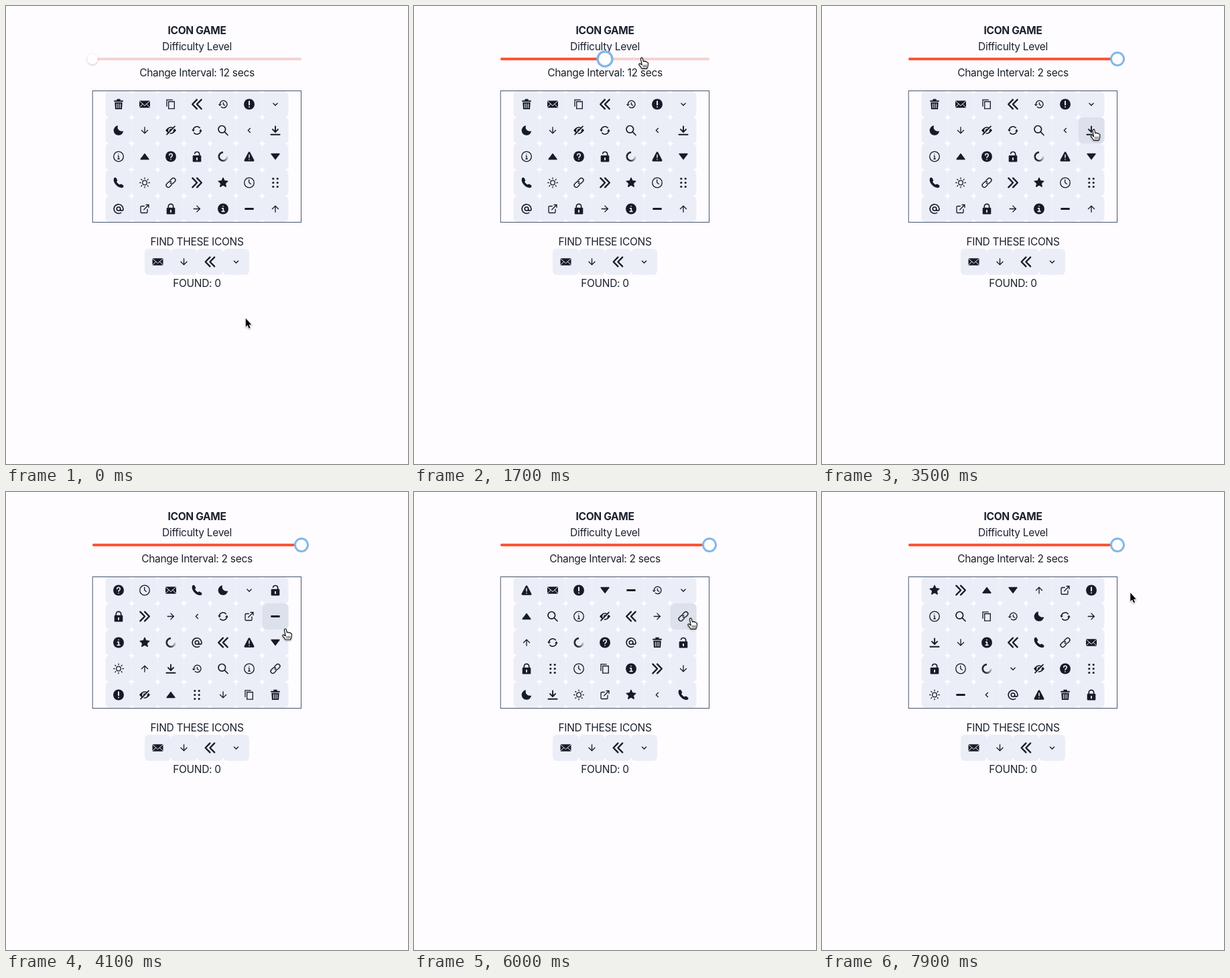
An HTML page with a canvas for the animation above (8000 ms loop, 600 by 683 pixels).

```html
<!DOCTYPE html>
<html lang="en">
<head>
<meta charset="utf-8">
<title>Icon game</title>
<style>
html, body { margin: 0; width: 100%; height: 100%; overflow: hidden; background: #fefcff; }
canvas { display: block; }
</style>
</head>
<body>
<canvas id="stage" width="600" height="683"></canvas>
<script>
const ctx = document.getElementById('stage').getContext('2d');
const LOOP = 8000, STEP = 100, CELL = 39;
const INK = '#171b27', CELL_COLOR = '#ebeef6', HOVER_COLOR = '#dde1eb';
const GRID = { x: 148.5, y: 127, cols: 7, rows: 5 };
const TRACK = { x: 129, y: 79, w: 312 };

const circle = (x, y, r) => `M${x - r} ${y}a${r} ${r} 0 1 0 ${2 * r} 0a${r} ${r} 0 1 0 ${-2 * r} 0z`;
const polar = (r, a) => `${r * Math.cos(a)} ${r * Math.sin(a)}`;
const ring = (n, fn) => Array.from({ length: n }, (_, i) => fn(i, i / n * 2 * Math.PI - Math.PI / 2)).join('');

const sunRays = ring(8, (i, a) => `M${polar(6, a)}L${polar(7.3, a)}`);
const starShape = ring(10, (i, a) => `${i ? 'L' : 'M'}${polar(i % 2 ? 3.5 : 7.3, a)}`) + 'z';
const gripDots = [-6, 0, 6].map(y => circle(-3.2, y, 1.6) + circle(3.2, y, 1.6)).join('');
const lockBody = 'M-5-1.7H5Q6.3-1.7 6.3-.4V6.7Q6.3 8 5 8H-5Q-6.3 8-6.3 6.7V-.4Q-6.3-1.7-5-1.7z';
const keyhole = 'M0 2.2V2.4M0 2.3V4.8';

// fill: solid part, cut: strokes in the cell colour, line: strokes on top
const ICONS = {
  T: { fill: 'M-6.7-5.7h13.4v2h-13.4zM-2.6-5.7v-2h5.2v2zM-5.7-2.8H5.7L5 7.6H-5z', cut: 'M-2.6-.6v6M0-.6v6M2.6-.6v6', cutW: 1.1 },
  M: { fill: 'M-7.3-5.3H7.3Q8-5.3 8-4.6V4.6Q8 5.3 7.3 5.3H-7.3Q-8 5.3-8 4.6V-4.6Q-8-5.3-7.3-5.3z', cut: 'M-8-5L0 2.2L8-5M-8 4.8L-2.8-.2M8 4.8L2.8-.2', cutW: 1 },
  C: { line: 'M-6 3.4V-6.7H2.7M-3.3-4H5.3V6.7H-3.3z', w: 1.33, sharp: true },
  L: { line: 'M6.65-6.8L-.1 0L6.65 6.8M-.1-6.8L-6.85 0L-.1 6.8', w: 2.35 },
  G: { line: 'M-6.65-6.8L.1 0L-6.65 6.8M.1-6.8L6.85 0L.1 6.8', w: 2.35 },
  H: { fill: 'M-7.4 0H-2L-4.7 2.7z', line: 'M-4.7 0A5.35 5.35 0 1 1-3.1 3.8M.4-2.7V.4L3.2 2', w: 1.33, sharp: true },
  W: { fill: circle(0, 0, 8), cut: 'M0-4.2V.8M0 3.9V4', cutW: 2 },
  v: { line: 'M-3.5-1.8L0 1.7L3.5-1.8', w: 1.33, sharp: true },
  '<': { line: 'M1.8-3.5L-1.7 0L1.8 3.5', w: 1.33, sharp: true },
  N: { fill: 'M-1.6-7.15A7.33 7.33 0 1 0 7.15 1.6L6.3 1.1A6 6 0 0 1-1.1-6.3z' },
  d: { line: 'M0-5.3V4.4M-4.9-.5L0 4.4L4.9-.5', w: 1.33, sharp: true },
  u: { line: 'M0 5.3V-4.4M-4.9.5L0-4.4L4.9.5', w: 1.33, sharp: true },
  r: { line: 'M-5.3 0H4.4M-.5-4.9L4.4 0L-.5 4.9', w: 1.33, sharp: true },
  E: { fill: 'M-8 0Q0-10.5 8 0Q0 10.5-8 0z', cut: circle(0, 0, 3) + 'M-5 7L7-5', cutW: 1.6, line: 'M-6 6.2L6-6.2', w: 1.7 },
  R: { fill: 'M-7.7-1.5L-3-1L-5.7 2zM7.7 1.5L3 1L5.7-2z', line: 'M-5.6-1.4A5.8 5.8 0 0 1 4.3-3.8M5.6 1.4A5.8 5.8 0 0 1-4.3 3.8', w: 1.67 },
  S: { line: circle(-1.7, -1.7, 5.3) + 'M2.4 2.4L7 7', w: 1.7 },
  D: { line: 'M0-6V2M-4.1-1.6L0 2.5L4.1-1.6M-6.6 6.2H6.6', w: 1.9 },
  i: { line: circle(0, 0, 7.3) + 'M-.9-.9H0V3.5M-1.2 3.5H1.3M-.2-3.6V-3.5', w: 1.33 },
  '^': { fill: 'M-.6-4.3Q0-5 .6-4.3L6.5 3.6Q7 4.6 6 4.7H-6Q-7 4.6-6.5 3.6z' },
  V: { fill: 'M-.6 4.3Q0 5 .6 4.3L6.5-3.6Q7-4.6 6-4.7H-6Q-7-4.6-6.5-3.6z' },
  '?': { fill: circle(0, 0, 8), cut: 'M-2.3-2A2.3 2.3 0 1 1 1.2 0Q0 .7 0 1.8M0 4.4V4.5', cutW: 1.6 },
  U: { fill: lockBody, cut: keyhole, cutW: 1.9, line: 'M3.7-1.7V-3.5A3.7 3.7 0 0 0-3.5-4.5', w: 1.67 },
  B: { fill: lockBody, cut: keyhole, cutW: 1.9, line: 'M3.7-1.7V-3.5A3.7 3.7 0 0 0-3.7-3.5V-1.7', w: 1.67 },
  '!': { fill: 'M-1.2-6.6Q0-8 1.2-6.6L7.4 5.3Q8 7.2 6.2 7.3H-6.2Q-8 7.2-7.4 5.3z', cut: 'M0-2.4V1.6M0 4.3V4.4', cutW: 1.5 },
  P: { fill: 'M-7.3-5.4C-6.6-8-4.2-8.3-3.2-6.5L-1.9-4C-1.5-3-2.1-2.4-3-1.5C-2 .8-.6 2 1.8 3.1C2.8 2 3.5 1.6 4.5 2.2L7 4C8 5 7.5 6.5 6 7.2C0 9.2-8.3 1-7.3-5.4z', line: 'M-5.7-5.5C-5.5 0 0 5.7 5.8 5.8', w: 2.6 },
  s: { line: circle(0, 0, 3.3) + sunRays, w: 1.33 },
  K: { line: 'M-1.2-3.2L1.6-6A3.1 3.1 0 0 1 6-1.6L3.6.8A3.1 3.1 0 0 1-.8.8M1.2 3.2L-1.6 6A3.1 3.1 0 0 1-6 1.6L-3.6-.8A3.1 3.1 0 0 1 .8-.8', w: 1.4 },
  '*': { fill: starShape, line: starShape, w: 1.2 },
  t: { line: circle(0, 0, 7.3) + 'M-.3-4.3V-.3L2.4 1.9', w: 1.33 },
  g: { fill: gripDots },
  '@': { line: circle(0, 0, 2.75) + 'M2.75 0V.6A2.1 2.1 0 0 0 6.95.6V0A6.95 6.8 0 1 0 3.6 5.9', w: 1.67 },
  X: { line: 'M2-6H6V-2M-1.3 1.3L6-6M4 .7V4.7Q4 6 2.7 6H-4.7Q-6 6-6 4.7V-2.7Q-6-4-4.7-4H-.7', w: 1.33 },
  I: { fill: circle(0, 0, 8), cut: 'M-1.4-.7H.3V3.8M-1.8 3.8H2M0-4V-3.9', cutW: 1.7 },
  '-': { fill: 'M-6-1.4H6Q6.7-1.4 6.7-.7V.7Q6.7 1.4 6 1.4H-6Q-6.7 1.4-6.7.7V-.7Q-6.7-1.4-6-1.4z' }
};
for (const icon of Object.values(ICONS))
  for (const part of ['fill', 'cut', 'line']) if (icon[part]) icon[part] = new Path2D(icon[part]);

const BOARDS = [
  [0, 'TMCLHWvNdERS<Di^?UO!VPsKG*tg@XBrI-u'],
  [4100, '?tMPNvUBGr<RX-I*O@L!VsuDHSiKWE^gdCT'],
  [5700, '!MWV-Hv^SiELrKuRO?@TUBgtCIGdNDsX*<P'],
  [6900, '*G^VuXWiSCHNRrDdILPKMUtOvE?gs-<@!TB']
];

// time, x, y of the pointer tip
const POINTER = [
  [300, 357, 465], [500, 330, 380], [900, 165, 31], [1200, 123, 78], [1400, 129, 78],
  [1700, 340, 78], [2100, 438, 79], [2200, 439, 79], [2700, 439, 79], [2800, 421, 131],
  [3100, 406, 184], [3400, 405, 183], [3600, 406, 187], [3900, 416, 204], [4100, 417, 204.9],
  [4200, 424, 208], [4300, 427, 209], [4600, 429, 208], [4800, 429, 208], [5200, 452, 198],
  [5400, 453, 197], [5600, 453, 197], [6000, 413, 189], [6300, 411, 187], [6600, 411, 187],
  [6700, 418, 190], [6800, 456, 198], [6900, 456, 198], [7300, 456, 198], [7500, 458, 153],
  [7800, 458, 153], [7900, 459.5, 149.5]
];

function pointerAt(t) {
  const next = POINTER.findIndex(key => key[0] > t);
  if (next < 1) return (next ? POINTER[POINTER.length - 1] : POINTER[0]).slice(1);
  const a = POINTER[next - 1], b = POINTER[next], k = (t - a[0]) / (b[0] - a[0]);
  return [a[1] + (b[1] - a[1]) * k, a[2] + (b[2] - a[2]) * k];
}

function cellAt([x, y]) {
  const col = Math.floor((x - GRID.x) / CELL), row = Math.floor((y - GRID.y) / CELL);
  const inside = x >= GRID.x && x < 421 && row >= 0 && row < GRID.rows;
  return inside ? row * GRID.cols + col : -1;
}

function disc(x, y, r, color) {
  ctx.fillStyle = color;
  ctx.beginPath();
  ctx.arc(x, y, r, 0, 2 * Math.PI);
  ctx.fill();
}

function bar(x, y, w, h, r, color) {
  ctx.fillStyle = color;
  ctx.beginPath();
  ctx.roundRect(x, y, w, h, r);
  ctx.fill();
}

function strokePath(path, width, color) {
  ctx.lineWidth = width;
  ctx.strokeStyle = color;
  ctx.stroke(path);
}

function drawSpinner() {
  ctx.strokeStyle = INK;
  ctx.lineWidth = 2.6;
  for (let i = 0; i < 18; i++) {
    const a = -Math.PI / 2 - i * Math.PI / 12;
    ctx.globalAlpha = i < 11 ? 1 : 1 - (i - 10) * 0.12;
    ctx.beginPath();
    ctx.arc(0, 0, 6.2, a, a - Math.PI / 12 - 0.02, true);
    ctx.stroke();
  }
}

function drawIcon(key, x, y, back) {
  ctx.save();
  ctx.translate(x, y);
  if (key === 'O') drawSpinner();
  else {
    const { fill, cut, cutW, line, w, sharp } = ICONS[key];
    ctx.fillStyle = INK;
    ctx.lineCap = sharp ? 'butt' : 'round';
    ctx.lineJoin = sharp ? 'miter' : 'round';
    if (fill) ctx.fill(fill);
    if (cut) strokePath(cut, cutW, back);
    if (line) strokePath(line, w, INK);
  }
  ctx.restore();
}

function drawCell(key, x, y, hover) {
  bar(x, y, CELL, CELL, 6, CELL_COLOR);
  if (hover) {
    ctx.globalAlpha = hover;
    bar(x, y, CELL, CELL, 6, HOVER_COLOR);
    ctx.globalAlpha = 1;
  }
  drawIcon(key, x + CELL / 2, y + CELL / 2, hover === 1 ? HOVER_COLOR : CELL_COLOR);
}

function text(label, y, weight = 400) {
  ctx.font = `${weight} 15.5px Inter, sans-serif`;
  ctx.letterSpacing = '-0.3px';
  ctx.textAlign = 'center';
  ctx.fillStyle = '#1a202c';
  ctx.fillText(label, 285, y);
}

function drawSlider(level, focused, dragging) {
  const x = TRACK.x + TRACK.w * level / 2, scale = dragging ? 1.15 : 1;
  bar(TRACK.x, TRACK.y - 2, TRACK.w, 4, 2, '#f8d1d1');
  if (level) bar(TRACK.x, TRACK.y - 2, x - TRACK.x, 4, 2, '#fb5438');
  if (focused) disc(x, TRACK.y, 11 * scale, '#82b7e6');
  ctx.save();
  if (!focused) {
    ctx.shadowColor = 'rgba(0,0,0,.22)';
    ctx.shadowBlur = 3;
    ctx.shadowOffsetY = 1;
  }
  disc(x, TRACK.y, 8 * scale, '#fffefe');
  ctx.restore();
}

const ARROW = new Path2D('M.8 .8V13.6L3.6 11L5.6 15.8L7.6 15L5.6 10.2H9.4z');
const HAND = new Path2D('M-1.6.4Q-.2-2 1.3.2L2.4 4.8Q4 3.4 5 5Q6.8 4 7.3 5.8Q9.3 5.4 9.4 7.8L9 11.8L7.6 15.4H.2L-4.2 9.4Q-4.4 7.6-2.8 7.8L.2 9.8z');
const CREASES = new Path2D('M2.2 10.3V13.3M4.4 10.1V13.3M6.6 10V13.1');

function drawPointer([x, y], hand) {
  ctx.save();
  ctx.translate(x, y);
  ctx.lineJoin = 'round';
  ctx.lineCap = 'round';
  ctx.shadowColor = 'rgba(0,0,0,.3)';
  ctx.shadowBlur = 2;
  ctx.shadowOffsetY = 1;
  strokePath(hand ? HAND : ARROW, 1.8, '#fff');
  ctx.shadowColor = 'transparent';
  ctx.fillStyle = hand ? '#fff' : '#000';
  ctx.fill(hand ? HAND : ARROW);
  if (hand) {
    strokePath(HAND, 1.1, '#000');
    strokePath(CREASES, 0.8, '#000');
  }
  ctx.restore();
}

function render(time) {
  const t = Math.floor(time % LOOP / STEP) * STEP;
  const pointer = pointerAt(t), [px, py] = pointer;
  const hot = cellAt(pointer), fading = t ? cellAt(pointerAt(t - STEP)) : -1;
  const level = t < 1300 || px < 207 && t < 2200 ? 0 : px < 363 && t < 2200 ? 1 : 2;
  const board = BOARDS.filter(b => b[0] <= t).pop()[1];

  ctx.fillStyle = '#fefcff';
  ctx.fillRect(0, 0, 600, 683);
  text('ICON GAME', 42, 700);
  text('Difficulty Level', 65.5);
  drawSlider(level, t >= 1300, t >= 1300 && t < 2200);
  text(`Change Interval: ${level === 2 ? 2 : 12} secs`, 104.5);

  [...board].forEach((key, i) => {
    const x = GRID.x + i % GRID.cols * CELL, y = GRID.y + Math.floor(i / GRID.cols) * CELL;
    drawCell(key, x, y, i === hot ? 1 : i === fading ? 0.4 : 0);
  });
  ctx.strokeStyle = '#48566b';
  ctx.lineWidth = 1;
  ctx.lineJoin = 'miter';
  ctx.strokeRect(129.2, 126.5, 311.3, 196);

  text('FIND THESE ICONS', 356.5);
  [...'MdLv'].forEach((key, i) => drawCell(key, 207 + i * CELL, 362, 0));
  text('FOUND: 0', 418.5);

  const onSlider = px > 118 && px < 453 && py > 68 && py < 91;
  drawPointer(pointer, hot >= 0 || onSlider);
}

const start = performance.now();
function tick() {
  render(performance.now() - start);
  requestAnimationFrame(tick);
}
tick();
</script>
</body>
</html>
```
